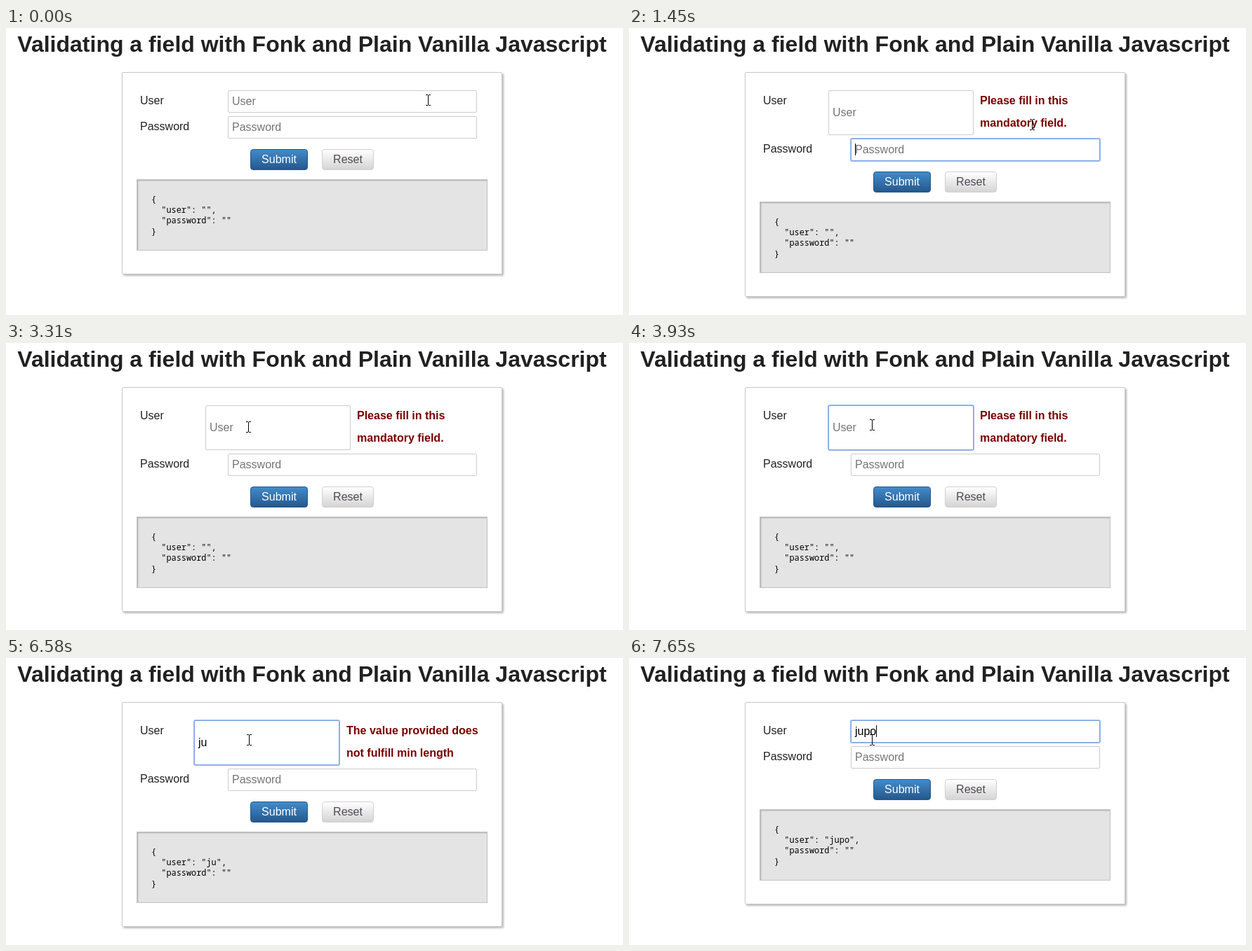
These frames come from a looping animation (879x410 px, 8000 ms). An HTML page:

```html
<!DOCTYPE html>
<html lang="en">
<head>
<meta charset="utf-8">
<title>Field validation</title>
<style>
  html, body { margin: 0; width: 100%; height: 100%; overflow: hidden; background: #fff; }
  body { position: relative; font: 16px/32px "Liberation Sans", Arial, sans-serif; color: #212121; }
  body > *, #lower > * { position: absolute; box-sizing: border-box; margin: 0; white-space: pre; }
  h1 { left: 0; top: 3px; width: 872px; font-size: 32px; line-height: 40px; text-align: center; }
  #card { left: 165px; top: 63px; width: 542px; border: 1px solid #c8c8c8; border-radius: 2px;
          box-shadow: 2px 2px 3px rgba(0, 0, 0, .28); }
  .label { left: 191px; }
  .field { left: 316px; width: 355px; height: 32px; line-height: 30px; padding-left: 5px;
           border: 1px solid #ccc; border-radius: 2px; background: #fff; color: #000; }
  .field.focus { border-color: #7fa5e6; box-shadow: 0 0 0 1px #9bbaf0; }
  .field i { display: inline-block; width: 1px; height: 17px; margin-right: -1px;
             vertical-align: -3px; background: #000; visibility: hidden; }
  .field.caret i { visibility: visible; }
  .field u { color: #757575; text-decoration: none; }
  #error { top: 89px; font-weight: bold; color: #7b0000; }
  #lower { left: 0; width: 879px; }
  .button { top: 47px; height: 30px; line-height: 28px; border-radius: 4px; text-align: center; }
  #submit { left: 348px; width: 82px; color: #fff; border: 1px solid #235a8e;
            background: linear-gradient(#428bca, #25588c); }
  #reset { left: 450px; width: 74px; color: #504a55; border: 1px solid #d0d0d0;
           background: linear-gradient(#fff, #d4d4d4); }
  pre { left: 186px; top: 90px; width: 500px; height: 102px; padding: 20px; color: #000;
        font: 11.9px/15.2px "Noto Sans Mono", "DejaVu Sans Mono", monospace;
        background: #e4e4e4; border: 1px solid #c4c4c4; box-shadow: inset 1px 1px 2px #aaa; }
  svg { left: 0; top: 0; overflow: visible; }
</style>
</head>
<body>
<h1>Validating a field with Fonk and Plain Vanilla Javascript</h1>
<div id="card"></div>
<div class="label" style="top:88px">User</div>
<div class="field" id="user" style="top:89px"><b style="font-weight:400"></b><i></i><u>User</u></div>
<div id="error"></div>
<div id="lower">
  <div class="label" style="top:-1px">Password</div>
  <div class="field" id="password" style="top:0"><i></i><u>Password</u></div>
  <div class="button" id="submit">Submit</div>
  <div class="button" id="reset">Reset</div>
  <pre></pre>
</div>
<svg id="pointer" width="1" height="1">
  <path id="beam" d="M-3 -7.5H0M1 -7.5H4M.5 -7V7M-3 7.5H0M1 7.5H4" fill="none" stroke="#000"/>
  <path id="arrow" d="M.5 .5V16.5L4.3 12.9L6.7 18.5L9.2 17.4L6.8 12H11.8Z" fill="#fff" stroke="#000"/>
</svg>
<script>
const $ = s => document.querySelector(s);
const LOOP = 8000;

// Timelines of [start, value]
const typed = [[0, ''], [4940, 'j'], [6030, 'ju'], [6730, 'jup'], [7650, 'jupo']];
const focus = [[0, ''], [680, 'user'], [1450, 'password'], [2300, ''], [3380, 'user']];
const layout = [[0, 0], [1450, 1], [4940, 2], [6730, 0]];
const caretToggles = [680, 1230, 1450, 2000, 3380, 3930, 4480, 5490, 5950, 6580, 6730, 7190, 7650];

const layouts = [
  { left: 316, width: 355, height: 32, message: '', messageLeft: 0 },
  { left: 284, width: 207, height: 64, message: 'Please fill in this\nmandatory field.', messageLeft: 500 },
  { left: 268, width: 207, height: 64, message: 'The value provided does\nnot fulfill min length', messageLeft: 485 },
];

// Pointer moves: first step, last step, number of steps, path
const moves = [
  [910, 1370, 7, [[601, 103], [574, 138]]],
  [1600, 2220, 9, [[574, 138], [564, 178], [555, 226]]],
  [2470, 3140, 10, [[555, 226], [547, 241], [470, 212], [395, 150], [350, 103], [345, 112]]],
  [3310, 3310, 1, [[345, 112], [345, 120]]],
  [3380, 3380, 1, [[345, 120], [346, 118]]],
  [3610, 3610, 1, [[346, 118], [346, 117]]],
];

const at = (timeline, t) => timeline.filter(([start]) => start <= t).pop()[1];

function along(path, p) {
  const f = p * (path.length - 1), i = Math.min(Math.floor(f), path.length - 2);
  return path[i].map((v, k) => Math.round(v + (path[i + 1][k] - v) * (f - i)));
}

function pointerAt(t) {
  const move = moves.filter(([start]) => start <= t).pop();
  if (!move) return moves[0][3][0];
  const [start, end, steps, path] = move;
  const interval = steps > 1 ? (end - start) / (steps - 1) : 1;
  const done = Math.min(steps, Math.floor((t - start) / interval + .1) + 1);
  const p = done / steps;
  return along(path, p * p * (3 - 2 * p));
}

function render(t) {
  const value = at(typed, t), focused = at(focus, t), box = layouts[at(layout, t)];
  const caretOn = caretToggles.filter(x => x <= t).length % 2 === 1;
  const grow = box.height - 32;

  for (const id of ['user', 'password'])
    $('#' + id).className = 'field' + (focused === id ? ' focus' + (caretOn ? ' caret' : '') : '');

  Object.assign($('#user').style, {
    left: box.left + 'px', width: box.width + 'px',
    height: box.height + 'px', lineHeight: box.height - 2 + 'px',
  });
  $('#user b').textContent = value;
  $('#user u').hidden = value !== '';
  $('#error').textContent = box.message;
  $('#error').style.left = box.messageLeft + 'px';
  $('#error').style.top = '88px';
  $('#card').style.height = 289 + grow + 'px';
  $('#lower').style.top = 126 + grow + 'px';
  $('pre').textContent = JSON.stringify({ user: value, password: '' }, null, 2);

  const [x, y] = pointerAt(t), overText = y < 192;
  $('#pointer').style.transform = `translate(${x}px, ${y}px)`;
  $('#beam').style.display = overText ? '' : 'none';
  $('#arrow').style.display = overText ? 'none' : '';
}

function tick(now) {
  render(now % LOOP);
  requestAnimationFrame(tick);
}
render(0);
requestAnimationFrame(tick);
</script>
</body>
</html>
```
